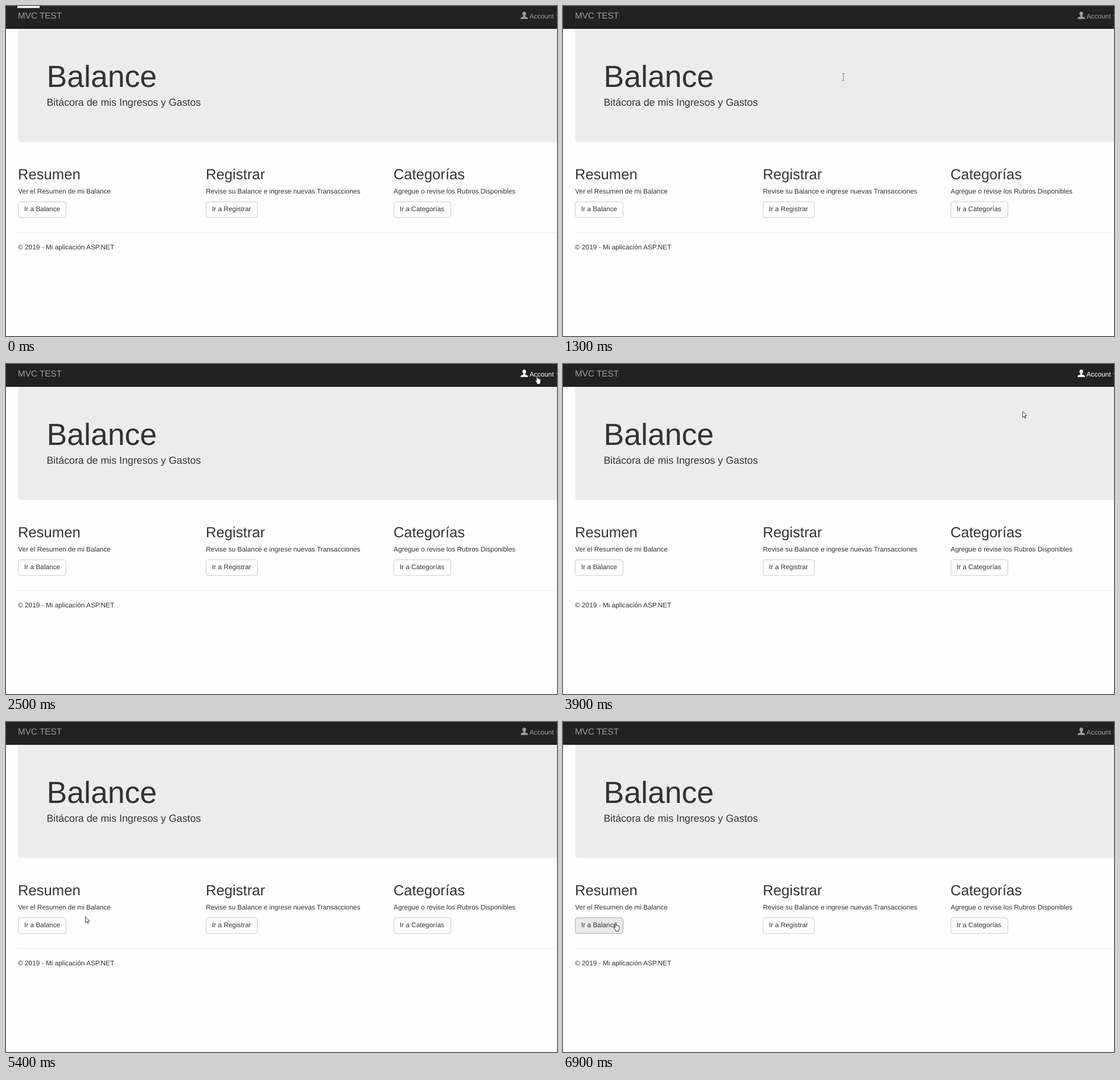
An HTML page for the animation above (8 s loop, 968 px wide and 579 px high).

```html
<!DOCTYPE html>
<html lang="es">
<head>
<meta charset="utf-8">
<title>Balance</title>
<style>
  html, body { margin: 0; width: 100%; height: 100%; overflow: hidden; background: #fefefe; }
  svg { display: block; }
  text { font: 11.85px "Liberation Sans", Arial, sans-serif; fill: #333; text-rendering: geometricPrecision; white-space: pre; }
  .brand { font-size: 15.3px; }
  .title { font-size: 53.6px; }
  .lead { font-size: 17.8px; }
  .heading { font-size: 25.65px; }
  .nav, .nav text { fill: #9d9d9d; }
  .nav.hover, .nav.hover text { fill: #fff; }
  .button rect { fill: #fff; stroke: #ccc; }
  .button.hover rect { fill: #e9e9e9; stroke: #adadad; }
  .button.pressed rect { fill: #d9d9d9; }
  .pointer { fill: #fff; stroke: #222; stroke-width: .9; stroke-linejoin: round; }
</style>
</head>
<body>
<svg width="968" height="579" viewBox="0 0 968 579">
  <rect x="21.5" y="37" width="960" height="201.5" rx="5" fill="#ececec"/>
  <rect width="968" height="40" fill="#222"/>
  <rect y="39" width="968" height="1" fill="#111"/>
  <rect id="tab" x="20" width="39" height="3.5" fill="#fff"/>

  <g id="brand" class="nav"><text class="brand" x="21" y="22">MVC TEST</text></g>
  <g id="account" class="nav">
    <ellipse cx="910.5" cy="13.6" rx="3.1" ry="3.8"/>
    <path d="M909 16h3v2.2l4 1.8q1 .6 1 2.8h-13q0-2.2 1-2.8l4-1.8z"/>
    <text x="919.7" y="21.6">Account</text>
    <path d="M966.5 16h7l-3.5 3.5z"/>
  </g>

  <text class="title" x="71.5" y="142">Balance</text>
  <text class="lead" x="71.5" y="175">Bitácora de mis Ingresos y Gastos</text>
  <g id="columns"></g>
  <path d="M21.5 397.5H968" stroke="#eee"/>
  <text x="21" y="426.8">© 2019 - Mi aplicación ASP.NET</text>

  <g class="pointer" id="pointer">
    <path id="arrow" d="M.5.6V11.2L2.9 8.9 4.5 12.6 6.1 11.9 4.5 8.2H7.8Z"/>
    <path id="hand" d="M3 9.6V1.6Q3 .5 4 .5T5 1.6V5.6Q5.2 4.8 6 5T6.8 6.2Q7.2 5.3 7.9 5.6T8.6 6.8Q9 6.1 9.6 6.5T10.2 7.8V11Q10.2 12.6 9.2 13.6V15.5H4V14L1 9.8Q.1 8.4 1 8T2.2 8.6Z"/>
    <path id="beam" d="M.3.5H2Q2.5.5 2.5 1.2V12.3Q2.5 13 2 13H.3M4.7.5H3Q2.5.5 2.5 1.2M2.5 12.3Q2.5 13 3 13H4.7" fill="none" stroke="#777"/>
  </g>
</svg>
<script>
  const LOOP = 8000;
  const byId = id => document.getElementById(id);

  const columns = [
    [21, 84, "Resumen", "Ver el Resumen de mi Balance", "Ir a Balance"],
    [351, 90, "Registrar", "Revise su Balance e ingrese nuevas Transacciones", "Ir a Registrar"],
    [680.7, 100, "Categorías", "Agregue o revise los Rubros Disponibles", "Ir a Categorías"],
  ];
  byId("columns").innerHTML = columns.map(([x, width, heading, note, action]) => `
    <text class="heading" x="${x}" y="304">${heading}</text>
    <text x="${x + .3}" y="329.3">${note}</text>
    <g class="button">
      <rect x="${Math.round(x) + .5}" y="343.5" width="${width}" height="27.5" rx="3.5"/>
      <text x="${x + 11}" y="360.3">${action}</text>
    </g>`).join("");
  const balanceButton = document.querySelector(".button");

  const moves = [
    [0, "none", 0, 0],
    [600, "hand", 45, 18], [700, "hand", 48, 16], [800, "arrow", 132, 66], [900, "beam", 216, 99],
    [1100, "beam", 293, 98], [1300, "beam", 490, 118], [1400, "beam", 678, 134],
    [1600, "arrow", 765, 85], [1700, "arrow", 850, 70], [1800, "arrow", 894.5, 61],
    [2100, "arrow", 908, 48], [2200, "hand", 922, 28], [2300, "hand", 932, 18], [2500, "hand", 929, 20],
    [3900, "arrow", 807, 82.5], [4000, "beam", 705, 122], [4100, "beam", 607, 170],
    [4300, "arrow", 490, 214], [4400, "arrow", 402, 248], [4600, "arrow", 348, 266],
    [4800, "arrow", 262, 292], [4900, "arrow", 208, 310], [5100, "beam", 162, 316],
    [5300, "arrow", 149, 334], [5400, "arrow", 139, 341],
    [5600, "arrow", 131, 343], [5700, "arrow", 124, 345], [5800, "arrow", 117, 347],
    [5900, "arrow", 109, 348], [6000, "hand", 97, 349],
    [6200, "hand", 94, 350], [6300, "hand", 91, 351], [6400, "hand", 88.5, 351.5],
  ];

  function draw(now) {
    const t = now % LOOP;
    const during = (from, to) => t >= from && t < to;
    const [, shape, x, y] = moves.findLast(move => move[0] <= t);

    byId("pointer").setAttribute("transform", `translate(${x} ${y})`);
    for (const id of ["arrow", "hand", "beam"]) byId(id).style.display = id === shape ? "" : "none";

    byId("tab").style.opacity = t < 600 ? 1 : Math.max(0, .9 - .3 * Math.floor((t - 600) / 100));
    byId("brand").classList.toggle("hover", during(600, 800));
    byId("account").classList.toggle("hover", during(2200, 4000));
    balanceButton.classList.toggle("hover", t >= 6200);
    balanceButton.classList.toggle("pressed", during(6700, 6900));
    requestAnimationFrame(frame);
  }

  let start;
  function frame(now) {
    start ??= now;
    draw(now - start);
  }
  frame(performance.now());
</script>
</body>
</html>
```
